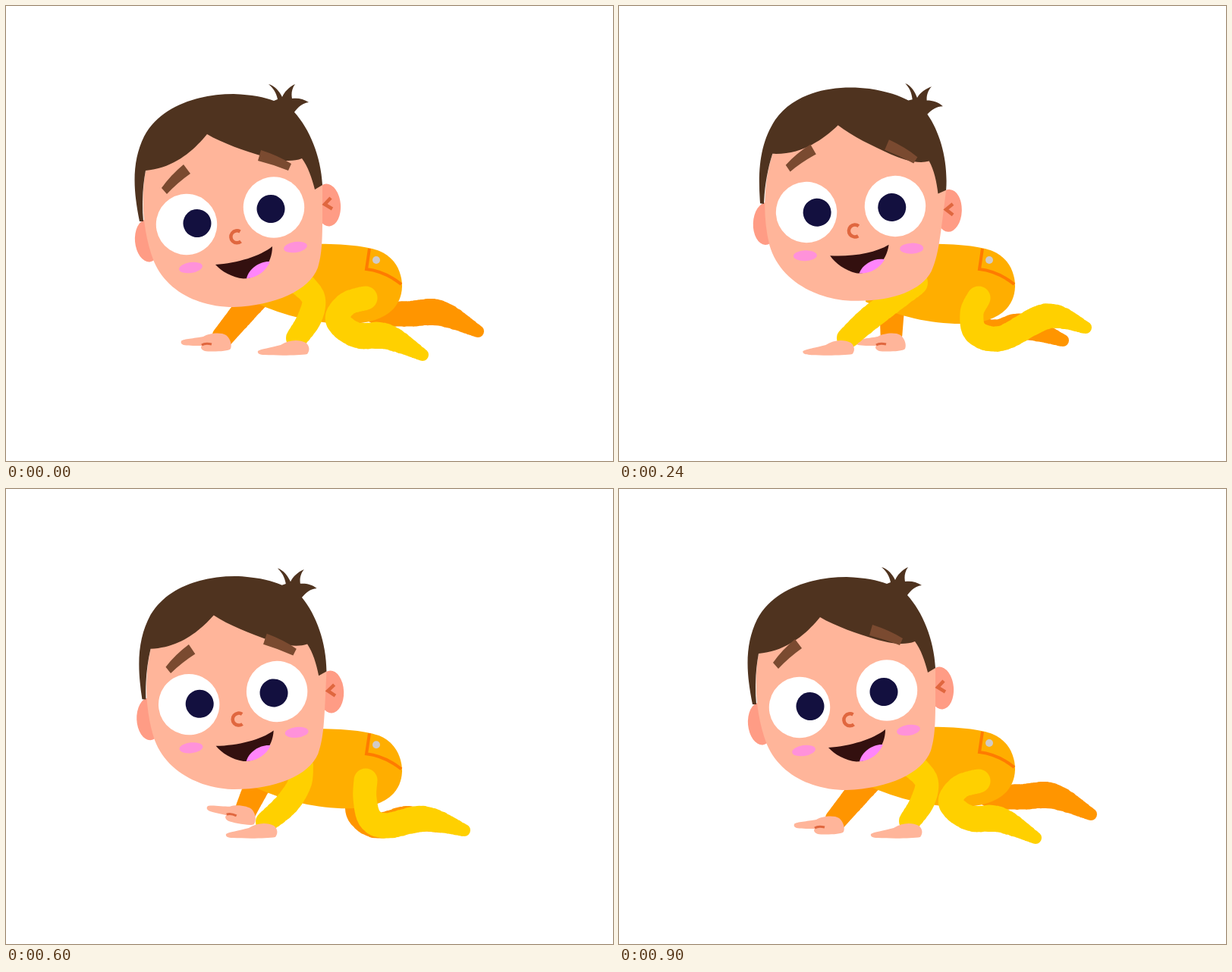
An HTML page that plays this animation: 800x600 px, repeating every 0.93 s.

```html
<!DOCTYPE html>
<html lang="en">
<head>
<meta charset="utf-8">
<title>Crawling baby</title>
<style>
html, body { margin: 0; width: 100%; height: 100%; overflow: hidden; background: #fff; }
svg { display: block; width: 100vw; height: 100vh; }
.far { fill: #ff9500; }
.near { fill: #ffd000; }
.skin { fill: #ffb59a; }
.shade { fill: #ff9c85; }
.hair { fill: #4f331f; }
.brow { fill: #7a4a30; }
.cheek { fill: #ff92da; }
.line { fill: none; stroke: #e0673f; stroke-width: 4.5; }
</style>
</head>
<body>
<svg viewBox="0 0 800 600">
  <defs>
    <clipPath id="lids"><path id="opening"/></clipPath>
  </defs>

  <path id="farArm" class="far"/>
  <g id="farHand">
    <path class="skin" d="M-45 -2C-44 -5 -25 -6 -16 -8C-8 -13 8 -14 14 -10C20 -5 22 3 20 8C17 12 -8 12 -14 11C-19 9 -20 6 -18 4C-26 4 -38 4 -42 3C-45 2 -46 0 -45 -2Z"/>
    <path class="line" style="stroke-width:3" d="M-18 3C-15 1 -9 1 -5 2"/>
  </g>
  <path id="farLeg" class="far"/>

  <g id="body">
    <path fill="#ffae00" d="M400 314C450 313 478 318 492 323C512 331 522 350 522 370C521 400 497 419 450 419C410 419 370 410 325 390L330 330Z"/>
    <path fill="none" stroke="#ff7b00" stroke-width="4" d="M479 320L475 347C492 349 506 355 521 367"/>
    <circle cx="488" cy="335" r="5" fill="#d0cac8"/>
  </g>

  <path id="nearLeg" class="near"/>
  <path id="nearArm" class="near"/>
  <path id="nearHand" class="skin" d="M-34 2C-30 -1 -18 -2 -4 -6C6 -13 20 -14 29 -9C34 -5 35 1 31 6C20 8 -10 8 -25 7C-32 7 -35 5 -34 2Z"/>

  <g id="head">
    <ellipse class="shade" cx="187" cy="309.5" rx="17" ry="28" transform="rotate(-5 187 309.5)"/>
    <ellipse class="shade" cx="424" cy="262.5" rx="17" ry="28" transform="rotate(-5 424 262.5)"/>
    <path class="skin" d="M184 217C178 250 179 295 195 337C212 377 255 397 300 397C355 395 400 375 411 345C418 322 417 300 417 236L390 195L265 160Z"/>
    <path class="line" d="M428 253L420 261.5L430 267.5"/>
    <path class="hair" d="M176 284C167 240 166 205 182 172C204 131 255 116 300 116C325 117 340 120 353 125L358 123C356 114 352 108 346 103C354 105 360 112 364 120C367 113 373 107 381 103C376 110 376 117 377 122C384 121 392 122 399 127C391 128 385 133 380 140C400 162 415 198 417 236L407 242C403 226 398 212 390 201C375 207 355 203 338 198C315 191 285 181 265 169C248 190 222 214 184 217C180 238 179 262 181 284Z"/>
    <g id="brows" class="brow">
      <path d="M205 240Q217 223 234 209L243 221Q226 233 212 248Z"/>
      <path d="M336 190Q358 197 376 208L372 217Q352 209 332 204Z"/>
    </g>
    <g transform="translate(238 288) rotate(-11)">
      <circle class="shade" r="39.7"/>
      <g clip-path="url(#lids)">
        <circle r="40.2" fill="#fff"/>
        <circle cx="14" cy="1.2" r="18.5" fill="#13103f"/>
      </g>
    </g>
    <g transform="translate(353 265.5) rotate(-11)">
      <circle class="shade" r="39.7"/>
      <g clip-path="url(#lids)">
        <circle r="40.2" fill="#fff"/>
        <circle cx="-4.3" cy="1.2" r="18.5" fill="#13103f"/>
      </g>
    </g>
    <path class="line" d="M308.5 297.5A8 8 0 1 0 309.5 310.5"/>
    <ellipse class="cheek" cx="243.5" cy="345" rx="15.5" ry="7" transform="rotate(-9 243.5 345)"/>
    <ellipse class="cheek" cx="381.5" cy="318" rx="15.5" ry="7" transform="rotate(-9 381.5 318)"/>
    <path fill="#33100f" d="M276 341C305 339 335 330 351 317C351 340 335 359 313 359.5C298 358 284 350 276 341Z"/>
    <path fill="#ff85fb" d="M317 359.3C320 346 335 336 348 337C343 349 332 358 317 359.3Z"/>
  </g>
</svg>
<script>
const LOOP = 930, STEP = 30;
const TIMES = [0, 90, 240, 480, 600, 720, 900];
const $ = id => document.getElementById(id);

// One row per pose, at TIMES; the last time repeats the first row.
const poses = {
  // head angle, body drop
  trunk: [[0, 0], [3, 0], [7.15, 0], [6.65, 6.6], [2.7, 2.3], [-0.2, 0]],
  // x, y, angle
  farHand: [[276, 444, 0], [308, 444, 0], [357, 444, 0], [369, 433, -15], [309, 430, 12], [260, 431, 12]],
  nearHand: [[366], [332], [276.5], [303.5], [324], [344.5]],
  // joints as x, y pairs
  farArm: [
    [345, 368, 316, 400, 286, 436],
    [350, 370, 335, 396, 315, 434],
    [362, 370, 360, 395, 359, 432],
    [352, 372, 362, 390, 368, 416],
    [345, 370, 329, 396, 316, 424],
    [345, 368, 313, 399, 277, 430]],
  nearArm: [
    [385, 362, 405, 385, 400, 412, 383, 438],
    [390, 365, 384, 388, 368, 415, 350, 438],
    [390, 365, 362, 388, 330, 412, 301, 438],
    [385, 365, 375, 391, 355, 417, 324, 439],
    [388, 365, 387, 388, 370, 415, 343, 439],
    [388, 362, 398, 386, 389, 412, 364, 438]],
  farLeg: [
    [470, 385, 480, 398, 495, 405, 530, 406, 572, 405, 622, 429],
    [470, 385, 470, 402, 480, 416, 510, 419, 553, 412, 608, 434],
    [470, 386, 465, 405, 472, 425, 500, 430, 532, 423, 585, 441],
    [470, 390, 461, 408, 459, 428, 480, 443, 515, 444, 561, 452],
    [470, 388, 463, 408, 466, 430, 490, 444, 533, 435, 575, 445],
    [470, 386, 462, 408, 475, 430, 512, 437, 550, 426, 608, 436]],
  nearLeg: [
    [474, 385, 449, 393, 437, 414, 462, 434, 502, 436, 549, 460],
    [474, 385, 456, 395, 450, 416, 477, 434, 524, 424, 574, 444],
    [474, 385, 465, 405, 471, 431, 505, 438, 565, 409, 615, 424],
    [475, 384, 483, 406, 500, 430, 528, 436, 573, 412, 620, 438],
    [474, 384, 473, 408, 480, 435, 502, 444, 552, 435, 604, 450],
    [475, 384, 459, 400, 457, 425, 485, 448, 522, 448, 580, 458]]
};

const radii = {
  farArm: [17, 16.5, 14.5],
  nearArm: [17, 15.5, 16, 14],
  farLeg: [15.5, 15.5, 16, 16.5, 16.5, 8],
  nearLeg: [15.5, 15.5, 16, 16.5, 16.5, 8]
};

const smooth = x => {
  const k = Math.min(1, Math.max(0, x));
  return k * k * (3 - 2 * k);
};

// Cubic from a to b with end slopes m and n.
const hermite = (a, b, m, n, u) => {
  const v = 1 - u;
  return a * v * v * (1 + 2 * u) + b * u * u * (3 - 2 * u) + m * u * v * v - n * u * u * v;
};

function poseAt(rows, t) {
  const time = k => k < 0 ? -STEP : k > 6 ? LOOP : TIMES[k];
  const row = k => rows[k < 0 || k > 5 ? 0 : k];
  let i = 0;
  while (i < 5 && t >= TIMES[i + 1]) i++;
  const span = time(i + 1) - time(i);
  const u = (t - time(i)) / span;
  const slope = (k, j) => (row(k + 1)[j] - row(k - 1)[j]) / (time(k + 1) - time(k - 1)) * span;
  return row(i).map((a, j) => hermite(a, row(i + 1)[j], slope(i, j), slope(i + 1, j), u));
}

// A soft tapered tube: discs laid along a smooth curve through the joints.
function tube(flat, sizes) {
  const pts = sizes.map((r, i) => [flat[2 * i], flat[2 * i + 1], r]);
  const last = pts.length - 1, n = 22;
  const at = k => pts[Math.min(last, Math.max(0, k))];
  let d = "";
  for (let s = 0; s <= last * n; s++) {
    const i = Math.min(last - 1, Math.floor(s / n));
    const [x, y, r] = [0, 1, 2].map(j => hermite(at(i)[j], at(i + 1)[j],
      (at(i + 1)[j] - at(i - 1)[j]) / 2, (at(i + 2)[j] - at(i)[j]) / 2, s / n - i));
    const R = r.toFixed(2), w = (2 * r).toFixed(2);
    d += `M${(x - r).toFixed(2)} ${y.toFixed(2)}a${R} ${R} 0 1 0 ${w} 0a${R} ${R} 0 1 0 -${w} 0`;
  }
  return d;
}

function lidOpening(shut) {
  const top = -41 + 47 * shut, low = 41 - 35 * shut, bulge = 16 * (1 - shut);
  return `M-46 ${top + bulge}Q0 ${top - bulge} 46 ${top + bulge}` +
    `L46 ${low - bulge}Q0 ${low + bulge} -46 ${low - bulge}Z`;
}

function draw(t) {
  for (const id in radii) $(id).setAttribute("d", tube(poseAt(poses[id], t), radii[id]));

  const [turn, drop] = poseAt(poses.trunk, t);
  $("body").setAttribute("transform", `translate(0 ${drop})`);
  $("head").setAttribute("transform", `translate(0 ${drop}) rotate(${turn} 370.5 352.5)`);

  const [x, y, angle] = poseAt(poses.farHand, t);
  $("farHand").setAttribute("transform", `translate(${x} ${y}) rotate(${angle})`);
  $("nearHand").setAttribute("transform", `translate(${poseAt(poses.nearHand, t)[0]} 453)`);

  const lift = Math.abs(Math.sin(Math.PI * t / 600));
  $("brows").setAttribute("transform", `translate(${-2 * lift} ${-11 * lift})`);

  const shut = t < 165 ? smooth((t - 36) / 120) : 1 - smooth((t - 165) / 65);
  $("opening").setAttribute("d", lidOpening(shut));
}

let shown = -1;
function tick() {
  const t = Math.floor(performance.now() % LOOP / STEP) * STEP;
  if (t !== shown) draw(shown = t);
  requestAnimationFrame(tick);
}
tick();
</script>
</body>
</html>
```
